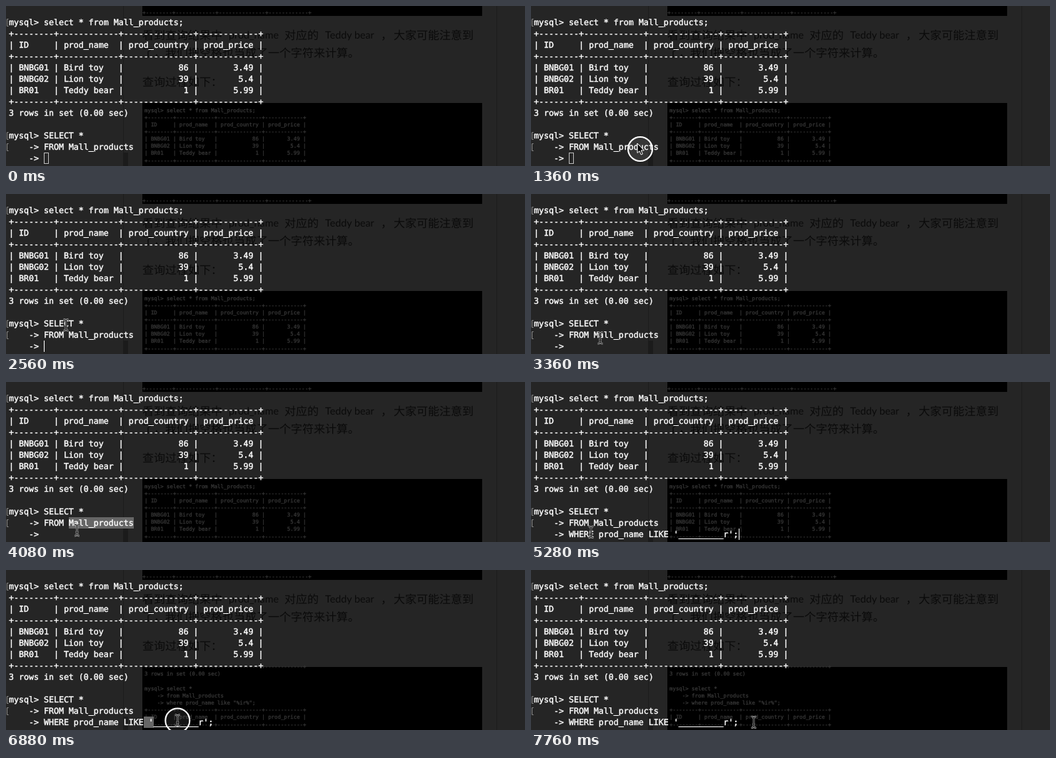
Write an HTML page that moves like this. It is 727 px wide and 226 px high and loops after 8 s.

```html
<!DOCTYPE html>
<html lang="en">
<head>
<meta charset="utf-8">
<title>Terminal query</title>
<style>
html, body { margin: 0; width: 100%; height: 100%; overflow: hidden; background: #252525; }
svg { display: block; width: 727px; height: 226px; }
text { white-space: pre; text-rendering: geometricPrecision; }
.term { font: 11.627px "DejaVu Sans Mono", monospace; fill: #fff; stroke: #fff; stroke-width: .4; }
.thumb { font: 7.39px "DejaVu Sans Mono", monospace; fill: #383838; stroke: #383838; stroke-width: .25; }
.page { font: 16px "Noto Sans CJK SC", "Noto Sans CJK", sans-serif; fill: #0b0b0b; }
.latin { font: 14.3px Lato, sans-serif; }
</style>
</head>
<body>
<svg viewBox="0 0 727 226">
  <rect width="727" height="226" fill="#252525"/>
  <path d="M164.5 0V226M687.5 0V226" stroke="#1d1d1d"/>
  <rect x="164" y="207" width="7" height="19" fill="#1b1b1b"/>
  <path d="M191 0H667V14H191ZM191 137H667V226H191Z"/>
  <g class="page">
    <text x="191" y="47">看到查询结果中</text>
    <text x="312" y="46" class="latin">prod_name</text>
    <text x="390" y="47">对应的</text>
    <text x="447" y="46" class="latin">Teddy bear</text>
    <text x="525" y="47">，</text>
    <text x="543" y="47">大家可能注意到</text>
    <text x="191" y="72">了，我们把空格也当成了一个字符来计算。</text>
    <text x="191" y="113">查询过程如下：</text>
  </g>
  <g class="thumb" id="top" style="font-size:7.72px"></g>
  <g class="thumb" id="before"></g>
  <g class="thumb" id="after"></g>
  <rect id="sel" height="16" fill="#666"/>
  <g class="term" id="term"></g>
  <path d="M3.5 18.5H1.5V28.5H3.5M3.5 178.5H1.5V188.5H3.5M3.5 194.5H1.5V204.5H3.5" fill="none" stroke="#888"/>
  <rect id="box" x="53.5" y="207.5" width="6" height="15" fill="none" stroke="#bbb"/>
  <rect id="bar" y="207" width="1" height="16" fill="#fff"/>
  <g id="mouse">
    <circle id="ring" r="17" fill="#fff" fill-opacity=".08" stroke="#fff" stroke-width="2"/>
    <path id="arrow" d="M-4 -8V5.5L-1 2.8L1.2 8L3.4 7L1.2 2H5.4Z" fill="#000" stroke="#fff"/>
    <g id="beam" fill="none">
      <g stroke="#a5a5a5" stroke-width="2.6">
        <path id="stem" d="M-3.5 -8Q0 -8 0 -5V5Q0 8 -3.5 8M3.5 -8Q0 -8 0 -5V5Q0 8 3.5 8M-2 3H2"/>
      </g>
      <use href="#stem" stroke="#222"/>
    </g>
  </g>
</svg>
<script>
const LOOP = 8000, STEP = 80, LEFT = 4, CELL = 7;
const el = id => document.getElementById(id);
const show = (id, on) => el(id).setAttribute('visibility', on ? 'visible' : 'hidden');
const set = (id, attrs) => {
  for (const key in attrs) el(id).setAttribute(key, attrs[key]);
};
const within = (t, from, to) => t >= from && t < to;

function addLines(id, lines, x, y, pitch) {
  lines.forEach((line, i) => {
    const text = document.createElementNS('http://www.w3.org/2000/svg', 'text');
    set.call(null, id, {});
    text.setAttribute('x', x);
    text.setAttribute('y', y + i * pitch);
    text.textContent = line;
    el(id).append(text);
  });
}

const rule = '+--------+------------+--------------+------------+';
const head = '| ID     | prod_name  | prod_country | prod_price |';
const table = [
  'mysql> select * from Mall_products;', rule, head, rule,
  '| BNBG01 | Bird toy   |           86 |       3.49 |',
  '| BNBG02 | Lion toy   |           39 |        5.4 |',
  '| BR01   | Teddy bear |            1 |       5.99 |', rule
];
const count = '3 rows in set (0.00 sec)';

addLines('term', [...table, count, '', 'mysql> SELECT *',
  '    -> FROM Mall_products', '    ->'], LEFT, 27, 16);
const prompt = el('term').lastChild;
addLines('top', [rule], 191, 11.5, 0);
addLines('before', table, 194, 149.5, 10.15);
addLines('after', [rule, count, '', 'mysql> select *', '    -> from Mall_products',
  '    -> where prod_name like "%ir%";', rule, head, rule], 194, 139.3, 10.15);

// Each move of the pointer: start and end time, then where it comes to rest
const moves = [
  [640, 960, 153, 202],
  [2180, 2560, 84, 185],
  [2660, 3920, 101, 209],
  [4060, 4400, 84, 212],
  [5700, 6640, 199, 211],
  [6780, 7200, 312, 215]
];

function pointerAt(t) {
  let x = 500, y = 228;
  for (const [start, end, toX, toY] of moves) {
    const k = Math.min(1, Math.max(0, (t - start) / (end - start)));
    const ease = Math.sin(k * Math.PI / 2);
    x += (toX - x) * ease;
    y += (toY - y) * ease;
  }
  return [x, y];
}

function draw(t) {
  const focused = t >= 1440, pasted = t >= 5280;
  const [x, y] = pointerAt(t);

  const line = '    ->' + (pasted ? " WHERE prod_name LIKE '_________r';" : '');
  if (prompt.textContent !== line) prompt.textContent = line;

  const blinkOn = Math.floor((t - (pasted ? 5270 : 1450)) / 490) % 2 === 0;
  show('box', !focused);
  show('bar', focused && blinkOn);
  set('bar', { x: LEFT + CELL * (pasted ? 41 : 7) });

  // A double-clicked word, later a drag that trails the pointer by one step
  const word = within(t, 3760, 5280), drag = within(t, 6880, 7600);
  const dragCell = Math.round((pointerAt(t - STEP)[0] - LEFT) / CELL);
  const from = word ? 12 : 27, to = word ? 25 : Math.min(41, dragCell);
  show('sel', word || drag);
  set('sel', { x: LEFT + CELL * from, y: word ? 191 : 207, width: CELL * Math.max(0, to - from) });

  show('before', t < 6000);
  show('after', t >= 6000);
  set('mouse', { transform: `translate(${x} ${y})` });
  show('arrow', within(t, 720, 1440));
  show('beam', focused);
  show('ring', within(t, 1360, 1440) || within(t, 3680, 3840) ||
    within(t, 6800, 7200) || within(t, 7520, 7600));
}

function tick() {
  draw(Math.floor(performance.now() % LOOP / STEP) * STEP);
  requestAnimationFrame(tick);
}
tick();
</script>
</body>
</html>
```
